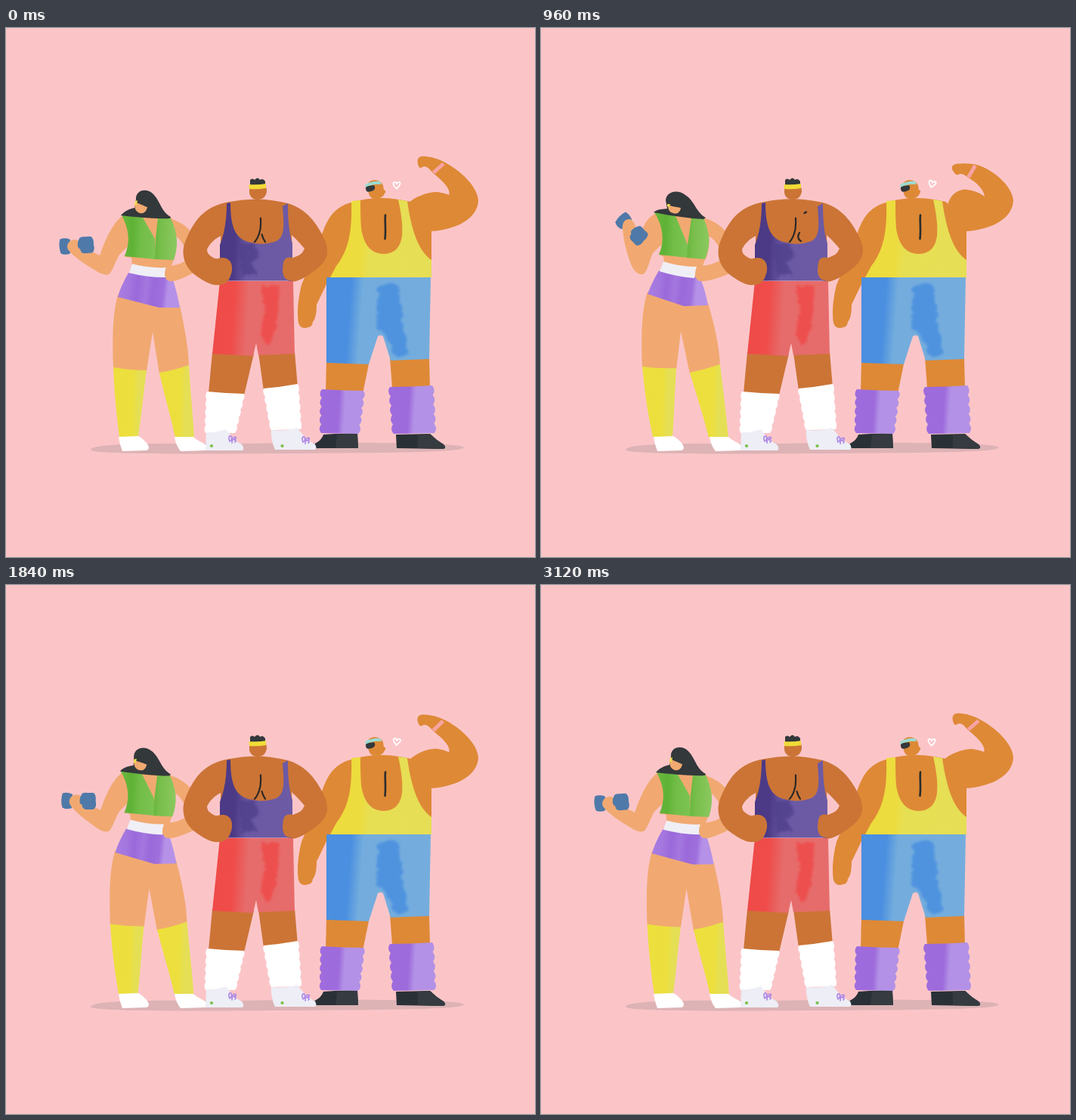
Recreate the animation shown at these times as an HTML page. Size 700 by 700 pixels, loop 3.2 s.

```html
<!DOCTYPE html>
<html lang="en">
<head>
<meta charset="utf-8">
<title>Gym trio</title>
<style>
html, body { margin: 0; width: 100%; height: 100%; overflow: hidden; background: #fbc5c8; }
svg { display: block; width: 100vw; height: 100vh; }
</style>
</head>
<body>
<svg id="stage" viewBox="0 0 700 700"></svg>
<script>
const LOOP = 3200, STEP = 80, PUMP = 1440;
const BG = '#fbc5c8', INK = '#33383b';
const SKIN = ['#f1a971', '#cb7436', '#de8936'];
const stage = document.getElementById('stage');
const moving = [];

// Value at time t on a list of [time, value] steps
function track(keys, t) {
  for (let i = 1; i < keys.length; i++) {
    const [t0, v0] = keys[i - 1], [t1, v1] = keys[i];
    if (t <= t1) return v0 + (v1 - v0) * (t - t0) / (t1 - t0);
  }
  return keys[keys.length - 1][1];
}

const NUM = /-?\d+(\.\d+)?/g;
function mix(a, b, k) {
  const ends = b.match(NUM);
  let i = 0;
  return a.replace(NUM, n => (+n + (ends[i++] - n) * k).toFixed(2));
}

function add(tag, attrs, parent = stage) {
  const el = document.createElementNS('http://www.w3.org/2000/svg', tag);
  for (const name in attrs) el.setAttribute(name, attrs[name]);
  parent.append(el);
  return el;
}

const fill = (color, d, extra) => add('path', { d, fill: color, ...extra });
const line = (color, width, d) => add('path', {
  d, fill: 'none', stroke: color, 'stroke-width': width, 'stroke-linecap': 'round', 'stroke-linejoin': 'round'
});
const rough = (color, d) => fill(color, d, { filter: 'url(#rough)', opacity: .85 });

// Registers a path that runs between two poses
function morph(el, key, a, b) {
  moving.push(p => el.setAttribute('d', mix(a, b, p[key])));
  return el;
}
const pose = (color, key, a, b) => morph(fill(color, a), key, a, b);

// Leg warmer with bumpy sides
function warmer(color, tl, tr, br, bl, n = 5, amp = 3) {
  const side = (from, to, out) => {
    let d = '';
    for (let i = 1; i <= n; i++) {
      const at = (k, j) => from[j] + (to[j] - from[j]) * k / n;
      d += `Q${at(i - .5, 0) + out * amp * 1.6} ${at(i - .5, 1)} ${at(i, 0)} ${at(i, 1)}`;
    }
    return d;
  };
  fill(color, `M${tl}Q${(tl[0] + tr[0]) / 2} ${(tl[1] + tr[1]) / 2 + 1} ${tr}` +
    side(tr, br, 1) + `L${bl}` + side(bl, tl, -1) + 'Z');
}

const defs = add('defs', {});
function grad(id, ...stops) {
  const g = add('linearGradient', { id, x2: 1, y2: .06 }, defs);
  stops.forEach(([offset, color]) => add('stop', { offset, 'stop-color': color }, g));
  return `url(#${id})`;
}
const filter = add('filter', { id: 'rough', x: '-30%', y: '-20%', width: '160%', height: '140%' }, defs);
add('feTurbulence', { type: 'fractalNoise', baseFrequency: .12, numOctaves: 3, seed: 4, result: 'n' }, filter);
add('feDisplacementMap', { in: 'SourceGraphic', in2: 'n', scale: 9, xChannelSelector: 'R', yChannelSelector: 'G', result: 'd' }, filter);
add('feGaussianBlur', { in: 'd', stdDeviation: 1.6 }, filter);

const LILAC = grad('lilac', [0, '#9f6cdd'], [.45, '#9d6bdc'], [.58, '#b391e6'], [1, '#b391e6']);
const BLUE = grad('blue', [0, '#4a8fe0'], [.24, '#4a8fe0'], [.36, '#74addd'], [1, '#74addd']);
const RED = grad('red', [0, '#ef4a48'], [.28, '#ef4c4a'], [.36, '#ea5b59'], [.46, '#e66c6b'], [1, '#e66c6b']);
const VIOLET = grad('violet', [0, '#4c3a86'], [.24, '#4c3a86'], [.42, '#6b59a4'], [1, '#6c5aa5']);
const LEMON = grad('lemon', [0, '#eddc3d'], [.33, '#eddc3d'], [.43, '#e7df53'], [1, '#e6de55']);
const SOCK = grad('sock', [0, '#eddf3c'], [.62, '#ecdf3e'], [.78, '#e5df55'], [1, '#e5df55']);
const LEAF = grad('leaf', [0, '#69b83d'], [.35, '#5fb236'], [.6, '#72bd48'], [1, '#7cc352']);
const LIME = grad('lime', [0, '#65b53b'], [.3, '#78be4b'], [1, '#8bc85f']);
const HIPS = grad('hips', [0, '#a97ee2'], [.2, '#a477df'], [.34, '#9b69da'], [.48, '#a477df'], [.6, '#9b69da'], [.76, '#9f70dd'], [.84, '#b592e8'], [1, '#b592e8']);

fill('#ddb3b5', 'M112 558C114 550 180 549 300 550C460 548 600 548 606 555C606 562 500 562 360 563C220 564 112 564 112 558Z');

function woman() {
  const skin = SKIN[0];
  // far arm
  pose(skin, 'upper',
    'M212 251C227 254 238 261 246 271L244 304C237 290 230 277 222 274Z',
    'M210 250C226 253 238 261 246 271L244 304C236 290 229 277 219 274Z');
  pose(skin, 'lower',
    'M250 303L236 309C226 316 213 313 211 319C208 329 212 336 220 335C230 334 242 327 252 322Z',
    'M250 302L232 310C222 316 207 313 205 319C202 329 206 336 214 335C226 334 240 329 252 324Z');
  // legs
  pose(skin, 'lower',
    'M148 353C142 375 140 400 142 452L186 454L194 402L203 458L242 449C242 425 236 395 230 367Z',
    'M141 349C134 370 132 400 134 451L179 453L185 401L197 458L237 448C236 420 230 395 221 364Z');
  pose(SOCK, 'lower',
    'M142 449Q164 453 186 453C182 482 179 515 175 541L150 541C146 510 143 480 142 449Z',
    'M134 448Q156 451 179 450C177 482 176 515 174 541L148 541C141 510 137 480 134 448Z');
  pose(SOCK, 'lower',
    'M203 456Q222 453 242 446C244 480 247 510 249 542L224 542C217 510 208 480 203 456Z',
    'M197 456Q217 452 237 445C241 480 245 510 248 542L222 542C214 510 204 480 197 456Z');
  fill('#fff', 'M149 541L175 540C182 544 188 550 189 555Q189 559 184 559L154 560Q150 550 149 541Z');
  fill('#fff', 'M223 541L248 541C255 548 264 549 266 554Q267 559 262 559L231 560Q225 553 223 541Z');
  // middle
  pose(skin, 'lower',
    'M156 300L223 304L219 314L214 334L164 326C167 316 167 310 166 304Z',
    'M155 298L218 303L214 315L205 334L158 324C163 316 163 310 162 303Z');
  pose(HIPS, 'lower',
    'M162 324L211 329L221 333C224 343 228 357 230 370L203 370L148 356C151 344 157 333 162 324Z',
    'M156 321L203 329L212 334C216 344 219 356 221 367L189 368L141 352C145 341 150 331 156 321Z');
  pose('#f0eff6', 'lower',
    'M167 312Q188 318 212 317L211 330Q186 330 163 324Z',
    'M162 309Q184 316 206 316L203 331Q179 329 157 322Z');
  // hand on hip
  pose(skin, 'lower',
    'M236 309C226 316 213 313 211 319C208 329 212 336 220 335C228 334 234 330 240 327Z',
    'M232 310C222 316 207 313 205 319C202 329 206 336 214 335C224 334 230 331 238 329Z');
  // chest and near arm
  pose(skin, 'upper',
    'M153 248L219 251C229 275 226 292 222 307L157 303C163 285 163 270 153 248Z',
    'M150 244L216 251C225 272 224 290 218 306L156 300C162 285 162 268 150 244Z');

  const bell = [add('g', {})];
  add('path', { d: 'M-21 -10Q-15 -12 -8 -9Q-5 0 -9 10Q-16 12 -21 9Q-24 0 -21 -10Z', fill: '#4f79a9' }, bell[0]);
  pose(skin, 'arm',
    'M155 248C143 256 133 275 124 301L104 291C101 285 96 280 91 280C84 280 79 287 82 293C87 300 100 310 112 317C120 322 128 328 136 326C141 322 145 308 150 300L166 284Z',
    'M153 245C143 250 138 255 134 268L126 266C125 260 122 255 118 253C111 252 107 258 108 266C109 280 112 292 116 304C120 318 126 327 135 326C141 323 144 306 148 298L164 282Z');
  bell.push(add('g', {}));
  add('path', { d: 'M4 -8Q5 -12 12 -11L20 -11Q24 -8 23 0Q25 8 20 11L10 11Q5 10 5 5Q1 4 2 -2Q2 -5 4 -8Z', fill: '#4f79a9' }, bell[1]);
  moving.push(p => bell.forEach(g => g.setAttribute('transform',
    mix('translate(93 288) rotate(-4)', 'translate(119.5 265.5) rotate(45)', p.arm))));

  // top
  pose(LEAF, 'upper',
    'M153 248L180 249L197 279L198 306L157 302C164 285 164 268 153 248Z',
    'M150 244L177 246L194 287L195 304L156 300C163 285 163 264 150 244Z');
  pose(LIME, 'upper',
    'M201 251L218 252C229 275 227 292 222 307L197 306L198 279Z',
    'M199 251L215 252C225 274 224 290 217 306L193 304L194 287Z');
  // head
  pose(INK, 'upper',
    'M172 227C171 215 185 211 194 219C204 228 205 243 218 250L217 252C198 253 170 250 152 248C157 242 164 239 170 238Z',
    'M165 228C166 216 181 213 191 221C203 228 205 244 218 251L215 253C198 252 175 249 149 244C154 239 162 240 167 239Z');
  pose(skin, 'upper',
    'M171 231C174 231 179 234 187 237C186 243 182 246 177 245C171 243 169 237 171 231Z',
    'M168 235C172 235 178 237 185 238C184 244 180 247 175 245C170 244 168 240 168 235Z');
  pose('#f2dc4d', 'upper',
    'M171 229L174 228L173 234L170 235Z',
    'M167 233L171 233L170 237L167 236Z');
}

function bigMan() {
  const skin = SKIN[2];
  fill(skin, 'M460 230C434 236 424 252 416 280L391 340C386 360 385 378 387 390C389 397 394 398 400 396Q405 396 406 389C410 384 411 376 411 366L424 339L437 318L470 290L500 305L563 307L563 265L536 230Q496 220 460 230Z');
  // legs
  fill(skin, 'M424 440H481L472 484H423Z');
  fill(skin, 'M508 436H560L561 476H511Z');
  warmer(LILAC, [418, 478], [473, 480], [466, 537], [417, 536]);
  warmer(LILAC, [508, 475], [564, 473], [567, 536], [513, 537]);
  fill('#293137', 'M420 538Q443 536 465 537L466 556H410Q404 555 409 550Q418 545 420 538Z');
  fill('#293137', 'M516 538L561 537L570 545L579 551Q584 556 578 557L517 556Z');
  fill('#353b40', 'M438 538L465 537L466 556H436Z');
  fill('#353b40', 'M545 538L561 537L570 545L579 551Q584 556 578 557L545 556Z');
  fill(BLUE, 'M424 330H562L560 438L509 440L499 408Q496 405 492 408L480 445L424 443Z');
  rough('#4a8fe0', 'M492 346Q505 334 519 340L531 434H514L503 405Q494 404 490 396Z');
  // flexed arm
  const armA = 'M533 231C541 224 556 217 571 217C578 218 584 220 586 221C589 214 580 204 565 192C561 187 556 181 551 184C547 187 546 183 545 180C543 171 548 169 556 170C566 171 574 174 581 178C602 189 624 210 625 228C624 253 595 267 562 269L545 262Z';
  const armB = 'M538 234C541 224 546 216 560 213.5C572 214 582 219 587 223C586 214 577 205 567 199C561 195 557 191 552 194C548 195 547 191 545 189C541 182 547 179 556 179.5C566 179 573 180 580 182C602 190 624 211 625 228C624 253 595 267 562 269L545 262Z';
  pose(skin, 'flex', armA, armB);
  const bandA = 'M565.5 191.5L579 179.5', bandB = 'M565.5 197.5L574.5 182';
  const band = line('#f7a3a3', 5, bandA);
  band.setAttribute('stroke-linecap', 'butt');
  morph(band, 'flex', bandA, bandB);
  // vest
  fill(LEMON, 'M457 229C458 265 455 292 437 315L429 330H563V307C545 295 536 265 531 229L519 227C524 250 525 262 524 275C522 292 512 299 500 299C482 299 473 285 470 265C469 250 469 240 469 228Z');
  line('#292d2c', 2.6, 'M502 247.5C501 256 503 266 501.5 279');
  // head
  fill(skin, 'M478 209C479 200 492 199 497 205C500 208 499 211 500 214Q504 216 501 219C499 224 494 226 488 226Q482 226 480 219Z');
  fill('#9bdcd2', 'M475 207.5Q484 202 495 203L497 207Q485 206 476 211Z');
  fill(INK, 'M476 213Q475 210 480 209L487 208Q490 212 486 215Q480 218 477 216Z');
  // heart
  const heart = line('#fff', 1.8, 'M0 4.5C-3 2 -5 0 -4.5 -2.5C-4 -5 -.5 -4.5 0 -1.5C1 -4.5 4 -5 4.5 -2.5C5 0 2 2 0 4.5Z');
  moving.push(p => heart.setAttribute('transform',
    mix('translate(517 208) rotate(0)', 'translate(517.5 206.3) rotate(16)', p.upper)));
}

function midMan() {
  const skin = SKIN[1];
  // legs
  fill(skin, 'M273 429L328 431L315 486L268 483Z');
  fill(skin, 'M334 430L382 428L386 476L341 480Z');
  warmer('#fff', [266, 481], [315, 484], [303, 536], [264, 536], 5, 2);
  warmer('#fff', [341, 477], [386, 471], [390, 531], [351, 532], 5, 2);
  fill('#edeef6', 'M265 535Q278 536 291 531L300 543Q306 548 312 551Q316 556 313 559H264Z');
  fill('#edeef6', 'M351 532Q372 534 385 529L396 542Q402 547 409 551Q412 556 409 558L356 558Q350 545 351 532Z');
  for (const [x, y] of [[300, 544], [397, 545]]) {
    line('#b18be5', 1.8, `M${x - 4} ${y + 3}C${x - 8} ${y - 6} ${x + 1} ${y - 6} ${x - 2} ${y + 1}C${x + 2} ${y - 6} ${x + 9} ${y - 1} ${x} ${y + 1}C${x + 4} ${y} ${x + 5} ${y + 3} ${x + 3} ${y + 4}M${x - 3} ${y + 2}Q${x} ${y + 1} ${x - 1} ${y + 5}`);
  }
  for (const cx of [272, 365.5]) add('circle', { cx, cy: 553, r: 2.1, fill: '#79c146' });
  // trunk and arms
  const trunkA = 'M296 230C264 235 248 253 236 286C231 304 239 319 252 328C264 337 278 341 287 339L300 330H365L376 336C387 336 396 330 410 320C424 309 428 300 423 283C412 258 397 239 373 232Q334 222 296 230Z';
  const trunkB = 'M296 230C264 235 248 253 236 286C231 304 239 319 252 328C264 337 278 341 287 339L300 330H365L376 336C387 336 396 330 410 320C424 309 429 300 424 283C413 257 398 238 373 231Q334 222 296 230Z';
  pose(skin, 'back', trunkA, trunkB);
  fill(BG, 'M284 275C276 279 269 286 266 293Q266 298 270 301Q277 307 284 305Z');
  fill(BG, 'M378 274C385 280 391 287 395 292Q393 297 389 300L379 306Z');
  fill(RED, 'M283 335H380L382 431L334 433L331 417L327 434L273 431Z');
  rough('#ef4a48', 'M337 341H362L360 380Q354 412 347 420L336 404L343 370Z');
  fill(VIOLET, 'M292 232L297 231C297 262 303 275 315 281C328 287 345 287 358 282C369 276 368 262 366 236L373 232C373 262 376 275 379 285L379 334.5H283L283 287C290 270 292 250 292 232Z');
  rough('#513f8c', 'M308 286H330L334 298L326 312L333 326H310Z');
  fill(skin, 'M264 300L276 307C284 303 291 303 296 308C300 313 300 322 297 328C295 335 290 340 282 340C273 341 266 337 258 332Z');
  fill(skin, 'M392 299L380 304C372 302 368 305 367 311C365 322 366 330 372 333C378 335 386 335 396 329Z');
  // spine
  line('#2b2826', 2.2, 'M337 251.5C337 260 338 264 335 272C333 278 331 281 329 283');
  const fold = ['M338.5 273C339 275 341 280 343 283', 'M342 271C339 275 340 280 344 282'];
  morph(line('#2b2826', 2.2, fold[0]), 'back', ...fold);
  const mark = line('#2b2826', 2.4, 'M348.5 245L351 243.5');
  moving.push(p => mark.setAttribute('opacity', p.back > .8 ? 1 : 0));
  // head
  fill(skin, 'M322 211L344 210Q346 216 344 220C342 225 338 227 333 227C326 227 322 222 322 217Z');
  fill(INK, 'M323 208L323 201Q326 198 329 201Q333 196 336 201Q340 198 343 203L343 208Z');
  fill('#f1db38', 'M321.5 207Q333 208 344 206L344 212Q333 214 322 213Z');
}

woman();
bigMan();
midMan();

const ARM = [[0, 0], [240, 0], [320, .04], [400, .1], [480, .2], [560, .34], [640, .57], [720, 1], [960, 1], [1040, .72], [1120, .36], [1200, .13], [1280, .04], [1360, 0]];
const UPPER = [[0, 0], [240, 0], [400, .4], [560, .92], [640, 1], [960, 1], [1040, .75], [1120, .38], [1200, .1], [1360, 0]];
const LOWER = [[0, 0], [160, 0], [400, .5], [560, .9], [640, .97], [960, 1], [1040, .88], [1200, .56], [1360, .12], [1440, 0]];
const BACK = [[0, 0], [480, 0], [640, .75], [720, 1], [960, 1], [1120, .35], [1200, 0]];
// Height of the raised fist
const FIST = [[0, 170], [160, 170], [480, 180], [640, 178], [800, 177], [960, 180], [1120, 178.5], [1440, 174], [1600, 170], [1760, 169.5], [1920, 174], [2160, 180.7], [2400, 178], [2640, 178], [2880, 176.5], [3120, 170], [3200, 170]];

function draw() {
  const t = Math.floor(performance.now() % LOOP / STEP) * STEP;
  const beat = t % PUMP;
  const p = {
    arm: track(ARM, beat),
    upper: track(UPPER, beat),
    lower: track(LOWER, beat),
    back: track(BACK, beat),
    flex: (track(FIST, t) - 170) / 10
  };
  moving.forEach(move => move(p));
  requestAnimationFrame(draw);
}
draw();
</script>
</body>
</html>
```
